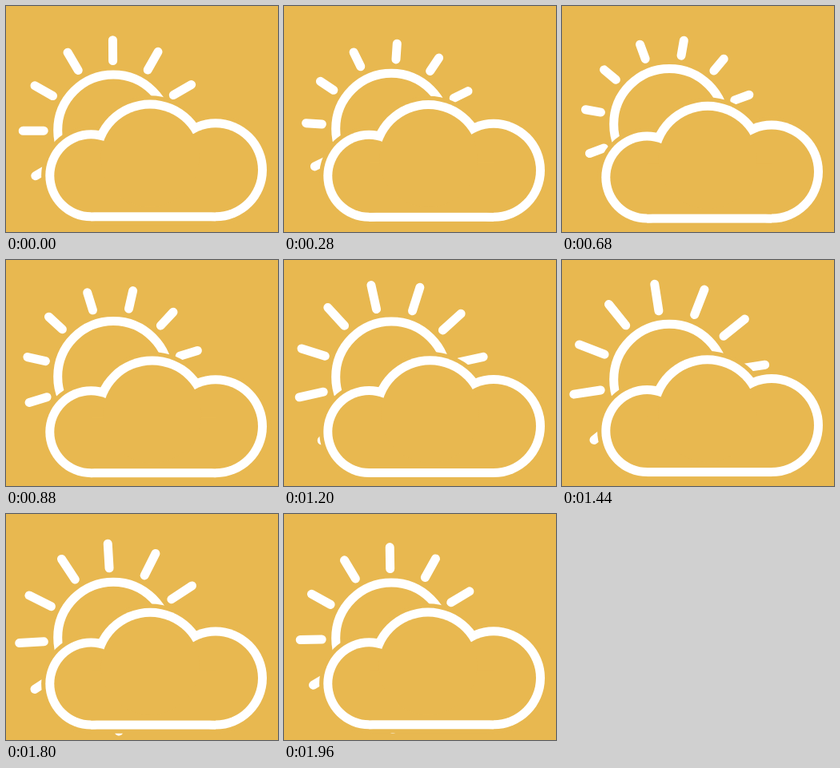
Animation of 340x283 px, one loop 2000 ms. Source, as an HTML page:

```html
<!DOCTYPE html>
<html lang="en">
<head>
<meta charset="utf-8">
<title>Sun behind a cloud</title>
<style>
  html, body { margin: 0; width: 100%; height: 100%; overflow: hidden; background: #e8b850; }
  svg { display: block; width: 100%; height: 100%; }
</style>
</head>
<body>
<svg id="stage" viewBox="0 0 340 283"></svg>
<script>
const LOOP = 2000;
const SKY = '#e8b850';
const WHITE = '#fff';
const LINE = 11;
const GAP = 5.2;
const RAY_START = 81.5;
const RAY_COUNT = 12;

const stage = document.getElementById('stage');

function add(parent, tag, attrs = {}) {
  const node = document.createElementNS('http://www.w3.org/2000/svg', tag);
  for (const name in attrs) node.setAttribute(name, attrs[name]);
  return parent.appendChild(node);
}

// The cloud is a union of shapes, grown or shrunk to form gap, outline and interior.
function addCloudLayer(parent, grow, fill) {
  const layer = add(parent, 'g', { fill });
  add(layer, 'circle', { cx: 106.3, cy: 212.3, r: 51.5 + grow });
  add(layer, 'circle', { cx: 262, cy: 205.3, r: 58.5 + grow });
  add(layer, 'rect', { x: 106.3, y: 195, width: 155.7, height: 68.8 + grow });
  return add(layer, 'circle', { cx: 180, cy: 190, r: 67 + grow });
}

const sun = add(stage, 'g', { fill: 'none', stroke: WHITE, 'stroke-width': LINE });
add(sun, 'circle', { r: 69.5 });
const wheel = add(sun, 'g', { 'stroke-linecap': 'round' });
const rays = Array.from({ length: RAY_COUNT }, (_, i) =>
  add(wheel, 'line', { y1: -RAY_START - LINE / 2, transform: `rotate(${i * 360 / RAY_COUNT})` }));

const cloud = add(stage, 'g');
const bumps = [
  addCloudLayer(cloud, LINE / 2 + GAP, SKY),
  addCloudLayer(cloud, LINE / 2, WHITE),
  addCloudLayer(cloud, -LINE / 2, SKY)
];

function render(time) {
  const phase = (time % LOOP) / LOOP;
  const angle = phase * 2 * Math.PI;
  const swing = (1 - Math.cos(angle)) / 2;
  const rayLength = 37 - 8 * Math.sin(angle);

  sun.setAttribute('transform', `translate(134.2 ${155.6 - 10 * swing})`);
  wheel.setAttribute('transform', `rotate(${phase * 360 / RAY_COUNT - 0.4})`);
  for (const ray of rays) ray.setAttribute('y2', -RAY_START - rayLength + LINE / 2);

  cloud.setAttribute('transform', `translate(0 ${3 * swing})`);
  for (const bump of bumps) bump.setAttribute('cx', 180 + 2.8 * swing);
}

const start = performance.now();
function tick() {
  render(performance.now() - start);
  requestAnimationFrame(tick);
}
tick();
</script>
</body>
</html>
```
